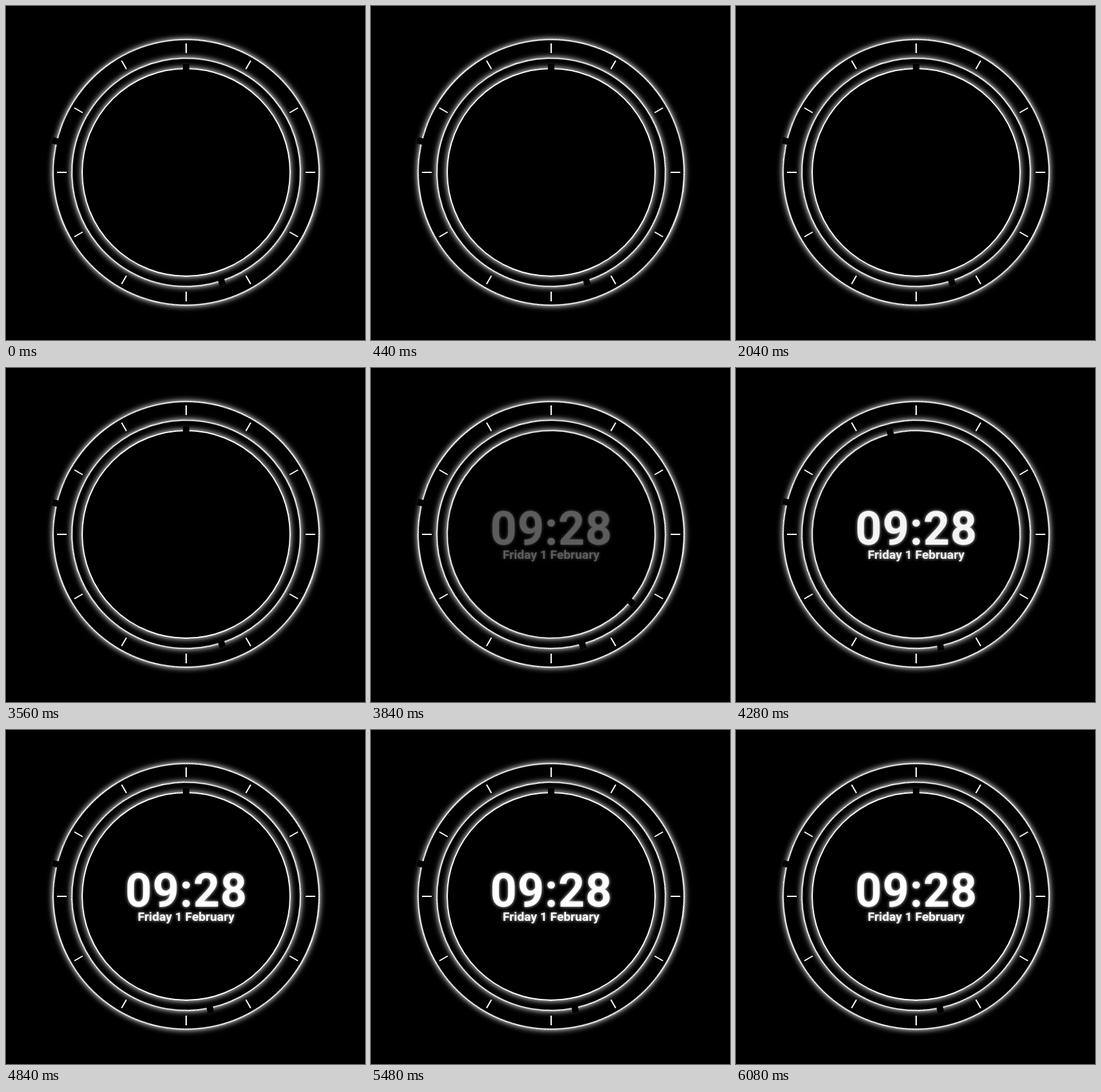
An HTML page that plays this animation: 556 px wide and 518 px high, repeating every 7.08 s.

```html
<!DOCTYPE html>
<html lang="en">
<head>
<meta charset="utf-8">
<title>Ring clock</title>
<style>
  html, body { margin: 0; width: 100%; height: 100%; overflow: hidden; background: #000; }
  #clock { position: absolute; left: 0; top: 0; width: 556px; height: 518px; overflow: hidden; background: #000; }
  .ring {
    position: absolute; left: 279px; top: 258px;
    width: calc(2 * var(--r)); height: calc(2 * var(--r));
    margin: calc(-1 * var(--r)) 0 0 calc(-1 * var(--r));
    box-sizing: border-box; border: 2px solid #fff; border-radius: 50%;
    box-shadow: 0 0 10px #fff;
  }
  .ring::after {
    content: ""; position: absolute; left: 50%; top: -8px;
    width: 10px; height: 10px; margin-left: -5px; background: #000;
  }
  #hour { --r: 207px; }
  #minute { --r: 178px; }
  #second { --r: 162px; }
  .tick {
    position: absolute; left: 278px; top: 58px; width: 2px; height: 15px;
    background: #fff; transform-origin: 1px 200px;
  }
  svg { position: absolute; left: 0; top: 0; }
  #label {
    fill: #fff; text-anchor: middle; font-family: Roboto, "Open Sans", sans-serif; font-weight: 700;
    filter: drop-shadow(0 0 2.5px rgba(255, 255, 255, .8));
  }
  #time { font-size: 71.5px; letter-spacing: 1px; }
  #date { font-size: 19.2px; }
</style>
</head>
<body>
<div id="clock">
  <div class="ring" id="hour"></div>
  <div class="ring" id="minute"></div>
  <div class="ring" id="second"></div>
  <svg width="556" height="518">
    <g id="label">
      <text id="time" x="279.5" y="274">09:28</text>
      <text id="date" x="279" y="296">Friday 1 February</text>
    </g>
  </svg>
</div>
<script>
  const LOOP = 7080, START = 3560, END = 4400, STEP = 40;
  const EASE = 'cubic-bezier(.325, .2, .638, 1)';
  const byId = id => document.getElementById(id);

  for (let i = 0; i < 12; i++) {
    const tick = document.createElement('div');
    tick.className = 'tick';
    tick.style.transform = `rotate(${i * 30}deg)`;
    byId('clock').append(tick);
  }

  // Hold the first value, ease to the second, hold until the loop ends.
  function change(id, prop, from, to) {
    const anim = byId(id).animate([
      { offset: 0, [prop]: from },
      { offset: START / LOOP, [prop]: from, easing: EASE },
      { offset: END / LOOP, [prop]: to },
      { offset: 1, [prop]: to }
    ], { duration: LOOP, fill: 'both' });
    anim.pause();
    return anim;
  }
  const turn = (id, from, to) => change(id, 'transform', `rotate(${from}deg)`, `rotate(${to}deg)`);

  const anims = [
    turn('hour', 283.5, 284),
    turn('minute', 162, 168),
    turn('second', 0, 360),
    change('label', 'opacity', 0, 1)
  ];

  const begin = performance.now();
  function draw() {
    const t = Math.max(0, performance.now() - begin) % LOOP;
    const at = Math.floor(t / STEP) * STEP;
    for (const a of anims) a.currentTime = at;
    requestAnimationFrame(draw);
  }
  draw();
</script>
</body>
</html>
```
